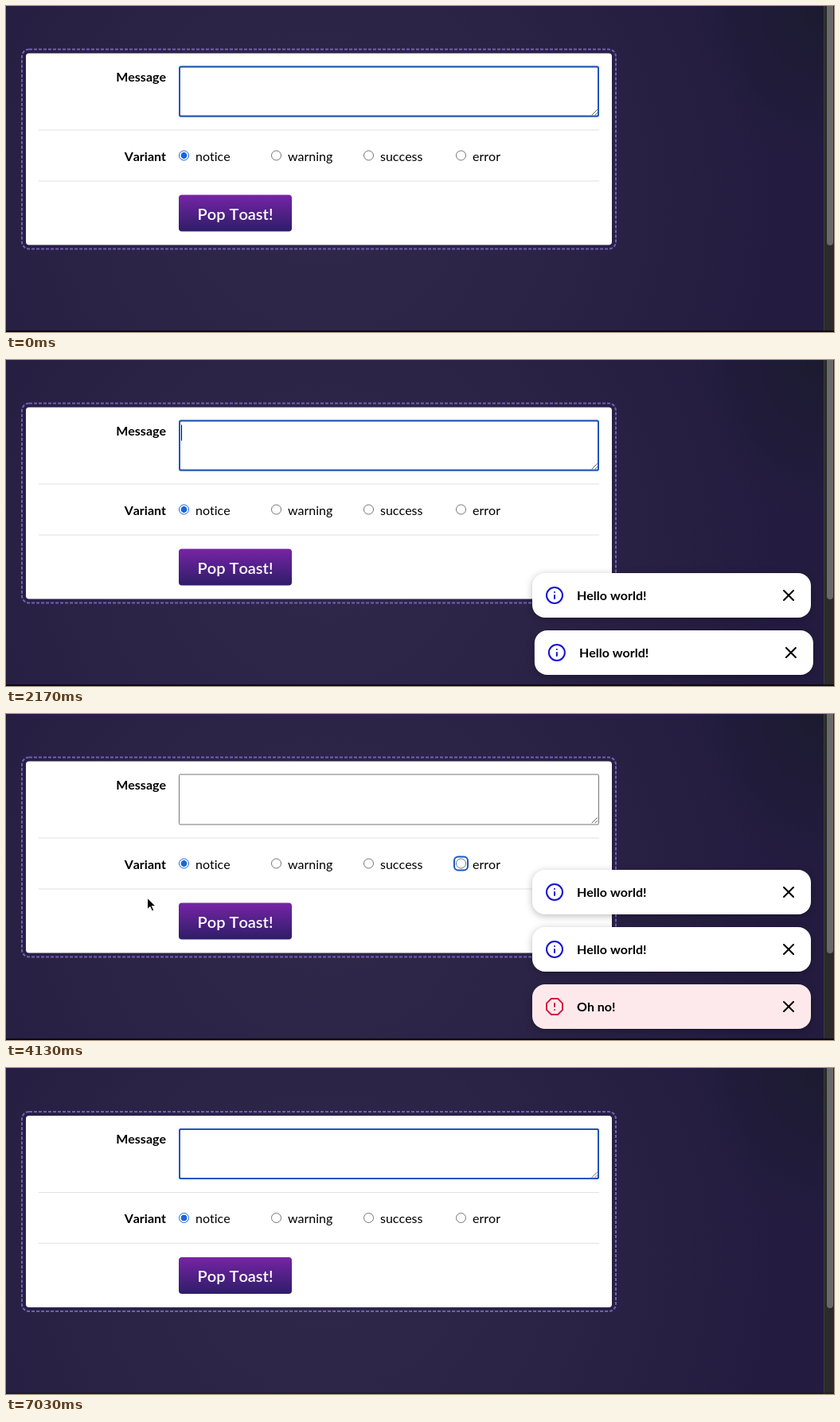
These frames come from a looping animation (1040x410 px, 7.07 s). An HTML page:

```html
<!DOCTYPE html>
<html lang="en">
<head>
<meta charset="utf-8">
<title>Toast playground</title>
<style>
html, body { margin: 0; width: 100%; height: 100%; overflow: hidden; }
body { position: relative; background: #231d3e; font: 16px/24px Lato, sans-serif; color: #000;
  font-kerning: none; font-variant-ligatures: none; }
body *, #page { position: absolute; box-sizing: border-box; }
#page {
  inset: 0 13px 0 0; overflow: hidden;
  background:
    radial-gradient(ellipse 170px 200px at 100% 0, #1c1a30, #1c1a3000),
    radial-gradient(ellipse 580px 560px at 400px 240px, #2f2849, #2b2446 45%, #231c40);
}
#form { left: 25px; top: 59px; width: 736px; height: 241px; background: #fff; border-radius: 4px; }
#dashes { left: -5px; top: -5px; stroke: #735eb8; }
#form > b { right: 560px; }
hr { left: 16px; width: 704px; height: 1px; margin: 0; border: 0; background: #e2e0e4; }
#field { left: 192px; top: 16px; width: 528px; height: 64px; border: 1px solid #767676; border-radius: 2px; }
#focus { inset: -1px; border: 2px solid #1b57bd; border-radius: 3px; }
#field svg { right: 0; bottom: 0; }
#typed { left: 2px; top: 3px; white-space: pre; }
#caret { left: 100%; top: 2px; width: 1px; height: 20px; background: #000; }
.option { top: 117px; white-space: nowrap; padding-left: 21px; }
.option i { left: 0; top: 5px; width: 13px; height: 13px; border: 1px solid #767676; border-radius: 50%; }
.option.checked i { border: 1.5px solid #1a66e0; background: radial-gradient(#1a66e0 3.6px, #fff 4.2px); }
.option.ring::before { content: ""; position: absolute; left: -3px; top: 2px; width: 19px; height: 19px;
  box-sizing: border-box; border: 2px solid #1b57bd; border-radius: 6px; }
#pop { left: 192px; top: 178px; width: 142px; height: 46px; border-radius: 4px; color: #fff;
  background: linear-gradient(#7724a6, #2d1d68); font-size: 20px; font-weight: 600; line-height: 46px; text-align: center; }
.toast { left: 661px; top: 340px; width: 350px; height: 56px; border-radius: 16px; background: #fff;
  font-weight: 700; line-height: 56px; padding-left: 56px; white-space: nowrap;
  filter: drop-shadow(0 2px 5px #0004); }
.toast.error { background: #fde9eb; }
svg { overflow: visible; fill: none; stroke-width: 2; stroke-linecap: round; stroke-linejoin: round; }
.icon { left: 16px; top: 16px; stroke: #1512d0; }
.error .icon { stroke: #d31a3f; }
.close { right: 16px; top: 16px; stroke: #000; }
#bar { right: 0; top: 0; width: 13px; height: 100%; background: #2b2b2b; border-left: 1px solid #3c3c3e; }
#thumb { left: 3px; top: -20px; width: 8px; height: 321px; border-radius: 4px; background: #6a6a6a; }
#edge { left: 0; bottom: 0; width: 100%; height: 2px; background: linear-gradient(#0b0914aa, #000); }
#cursor { left: 0; top: 0; stroke-width: 1.1; }
</style>
</head>
<body>
<div id="page">
  <div id="form">
    <svg id="dashes" width="746" height="251" stroke-dasharray="4 2" stroke-linecap="butt" style="stroke-linecap:butt">
      <rect width="746" height="251" rx="9"/>
    </svg>
    <b style="top:17px">Message</b>
    <div id="field">
      <div id="focus"></div>
      <svg width="10" height="10" stroke="#666" style="stroke-width:1"><path d="M2 8.5 8.5 2M6 8.5 8.5 6"/></svg>
      <div id="typed"><span id="text" style="position:static"></span><span id="caret"></span></div>
    </div>
    <hr style="top:96px">
    <b style="top:117px">Variant</b>
    <hr style="top:160px">
    <div id="pop">Pop Toast!</div>
  </div>
</div>
<div id="bar"><div id="thumb"></div></div>
<div id="edge"></div>
<svg id="cursor" width="20" height="20">
  <g id="hand" fill="#fff" stroke="#222">
    <path d="M-1 10V1a1.4 1.4 0 0 1 2.8 0V6q2.8-1 3 .8 2.5-.9 2.7.9 2.3-.5 2.3 1.5v3q0 2-1.4 3.6V17.5H1.2v-1.700q-2-2-4.400-5.400-1-1.800.600-2.100 1-.100 1.600 1.700z"/>
    <path d="M2.600 11v3.500M5 11v3.500M7.400 11v3.500"/>
  </g>
  <path id="arrow" fill="#000" stroke="#fff" d="M0 0V15l3.500-3.300 2.300 5.300 2.500-1.100-2.300-5.100h4.800z"/>
</svg>
<script>
const LOOP = 7070, SLIDE = 600, KEY_GAP = 52;
const $ = id => document.getElementById(id);
const page = $('page'), form = $('form');

const typing = [
  { text: 'Hello world!', from: 30, sent: 662 },
  { text: 'Hello world!', from: 1235, sent: 1867 },
  { text: 'Oh no!', from: 2330, sent: 3284 },
];
const toasts = [
  { text: 'Hello world!', from: 662, to: 4670 },
  { text: 'Hello world!', from: 1867, to: 6230 },
  { text: 'Oh no!', from: 3284, to: 5640, error: true },
];
// Keyboard focus on the radios: [time, index]
const radioFocus = [[2700, 0], [2790, 1], [2890, 2], [2970, 3], [4670, -1]];
// Pointer moves: start, end, from, bend, to
const moves = [
  [4030, 4500, [76, 164], [500, 480], [986, 225]],
  [4680, 4930, [986, 225], [990, 260], [987, 297]],
  [5230, 5620, [987, 297], [988, 330], [981, 369]],
  [6230, 6530, [981, 369], [1000, 366], [1021, 352]],
];

const clamp = v => Math.min(1, Math.max(0, v));
const bezier = (a, b, s) => 3 * (1 - s) ** 2 * s * a + 3 * (1 - s) * s * s * b + s ** 3;

function slideEase(x) {
  let lo = 0, hi = 1;
  for (let i = 0; i < 24; i++) {
    const mid = (lo + hi) / 2;
    if (bezier(0.175, 0.32, mid) < x) lo = mid; else hi = mid;
  }
  return bezier(0.885, 1.1, lo);
}

function add(parent, className, html) {
  const el = document.createElement('div');
  el.className = className;
  el.innerHTML = html;
  return parent.appendChild(el);
}

const options = ['notice', 'warning', 'success', 'error'].map((name, i) => {
  const el = add(form, 'option', `<i></i>${name}`);
  el.style.left = 192 + 116 * i + 'px';
  return el;
});

const svg = (cls, body) => `<svg class="${cls}" width="24" height="24">${body}</svg>`;
const infoIcon = '<circle cx="12" cy="12" r="10"/><path d="M12 16v-4M12 8h.01"/>';
const alertIcon = '<path d="M7.86 2h8.28L22 7.86v8.28L16.14 22H7.86L2 16.14V7.86zM12 8v4M12 16h.01"/>';
for (const toast of toasts) {
  toast.el = add(page, toast.error ? 'toast error' : 'toast',
    svg('icon', toast.error ? alertIcon : infoIcon) + toast.text + svg('close', '<path d="M18 6 6 18M6 6l12 12"/>'));
}

function drawField(t, fade) {
  const entry = typing.find(e => t >= e.from && t < e.sent);
  const count = entry ? Math.floor((t - entry.from) / KEY_GAP) + 1 : 0;
  $('text').textContent = entry ? entry.text.slice(0, count) : '';

  const focused = t < radioFocus[0][0];
  $('focus').style.opacity = focused ? 1 : fade;
  const lastInput = Math.max(...typing.flatMap(e => [
    t >= e.from ? Math.min(t, e.from + KEY_GAP * (e.text.length - 1)) : -LOOP,
    t >= e.sent ? e.sent : -LOOP,
  ]));
  $('caret').hidden = !focused || t - lastInput > 320;
}

function drawRadios(t) {
  const step = radioFocus.filter(([at]) => at <= t).pop();
  const ring = step ? step[1] : -1;
  const checked = ring > 0 && t < typing[2].sent ? ring : 0;
  options.forEach((el, i) => {
    el.classList.toggle('checked', i === checked);
    el.classList.toggle('ring', i === ring);
  });
}

function drawToasts(t) {
  const live = toasts.filter(x => t >= x.from && t < x.to);
  for (const toast of toasts) {
    const row = live.length - 1 - live.indexOf(toast);
    const x = 366 * (1 - slideEase(clamp((t - toast.from) / SLIDE)));
    toast.el.hidden = !live.includes(toast);
    toast.el.style.transform = `translate(${x}px, ${-72 * row}px)`;
  }
  return live.length;
}

function drawCursor(t, liveCount, fade) {
  const move = moves.filter(m => m[0] <= t).pop();
  $('cursor').style.opacity = move ? 1 - fade : 0;
  if (!move) return;
  const [start, end, a, bend, b] = move;
  const p = clamp((t - start) / (end - start)), s = p * p * (3 - 2 * p);
  const [x, y] = a.map((v, i) => (1 - s) ** 2 * v + 2 * s * (1 - s) * bend[i] + s * s * b[i]);
  const row = Math.round((368 - y) / 72);
  const overClose = Math.abs(x - 983) < 13 && Math.abs(368 - 72 * row - y) < 13 && row >= 0 && row < liveCount;
  $('hand').style.display = overClose ? '' : 'none';
  $('arrow').style.display = overClose ? 'none' : '';
  $('cursor').style.transform = `translate(${x}px, ${y}px)`;
}

function draw() {
  const t = performance.now() % LOOP;
  const fade = clamp((t - 6870) / 160);
  drawField(t, fade);
  drawRadios(t);
  drawCursor(t, drawToasts(t), fade);
  form.style.transform = `translateY(${0.5 + fade / 2}px)`;
  $('thumb').style.top = -20 + fade + 'px';
  $('edge').style.opacity = 1 - 0.7 * fade;
  requestAnimationFrame(draw);
}
draw();
</script>
</body>
</html>
```
